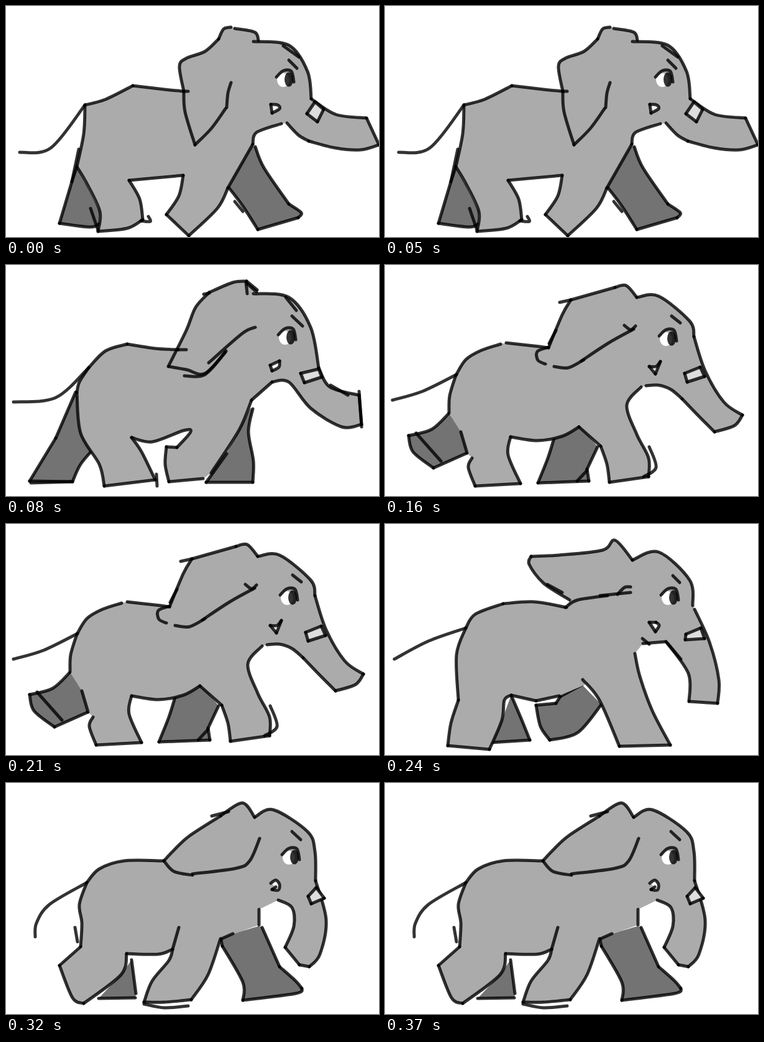
An HTML page that plays this animation: 600 px wide and 371 px high, repeating every 0.4 s.

```html
<!DOCTYPE html>
<html lang="en">
<head>
<meta charset="utf-8">
<title>Walking elephant</title>
<style>
html, body { margin: 0; width: 100%; height: 100%; overflow: hidden; background: #fff; }
svg { display: block; width: 100vw; height: 100vh; }
.pose { opacity: 0; animation: show 400ms step-end infinite; animation-delay: calc(var(--i) * 80ms - 400ms); }
@keyframes show { 0% { opacity: 1; } 20%, 100% { opacity: 0; } }
.skin { fill: #ababab; }
.far { fill: #737373; }
.band { fill: #dedede; }
.white { fill: #fff; }
.pupil { fill: #000; fill-opacity: .8; }
.ink { fill: none; stroke: #000; stroke-opacity: .8; stroke-width: 5; stroke-linecap: round; stroke-linejoin: round; }
</style>
</head>
<body>
<svg id="stage" viewBox="0 0 600 371"></svg>
<script>
const stage = document.getElementById('stage');
let group, count = 0;

function add(parent, tag, attrs) {
  const el = document.createElementNS(stage.namespaceURI, tag);
  for (const key in attrs) el.setAttribute(key, attrs[key]);
  return parent.appendChild(el);
}

function points(text) {
  const n = text.match(/-?\d+/g).map(Number);
  return n.filter((_, i) => i % 2 === 0).map((x, i) => [x, n[2 * i + 1]]);
}

// Catmull-Rom spline as Bezier commands, without the starting move.
function curve(p) {
  let d = '';
  for (let i = 0; i + 1 < p.length; i++) {
    const a = p[i - 1] || p[i], b = p[i], c = p[i + 1], e = p[i + 2] || c;
    const c1 = b.map((v, k) => v + (c[k] - a[k]) / 6);
    const c2 = c.map((v, k) => v - (e[k] - b[k]) / 6);
    d += 'C' + [c1, c2, c].join(' ');
  }
  return d;
}

const stroke = d => add(group, 'path', { class: 'ink', d });

// A filled outline: "/" is a corner, "~" a stretch without ink.
function shape(name, text) {
  let end, d = '';
  const inked = [];
  for (const part of text.split('/')) {
    const p = points(part);
    if (end) p.unshift(end);
    const move = 'M' + p[0], c = curve(p);
    d += end ? c : move + c;
    if (!part.includes('~')) inked.push(move + c);
    end = p[p.length - 1];
  }
  add(group, 'path', { class: name, d: d + 'Z' });
  inked.forEach(stroke);
}

function lines(text) {
  for (const part of text.split(',')) {
    const p = points(part);
    stroke('M' + p[0] + curve(p));
  }
}

function eye(x, y) {
  add(group, 'ellipse', { class: 'white', cx: x - 8, cy: y + 1, rx: 10, ry: 11 });
  add(group, 'ellipse', { class: 'pupil', cx: x + 1, cy: y, rx: 7, ry: 11.5 });
  const lid = [[-19, -4], [-8, -14], [5, -13], [9, 4]].map(([u, v]) => [x + u, y + v]);
  stroke('M' + lid[0] + curve(lid));
}

function pose(draw) {
  group = add(stage, 'g', { class: 'pose', style: `--i:${count++}` });
  draw();
}

pose(() => {
  shape('far', '114 258 106 282 / 86 349 / 135 355 150 350 / ~ 151 330 / ~ 114 258');
  shape('far', '401 226 415 260 455 318 / 475 332 470 340 / 405 359 / 380 320 357 290 / ~ 395 225');
  shape('skin', `127 159 160 150 204 128 / 255 134 286 137 / 279 97 290 84 320 73 342 53 / 350 37 362 34 /
    ~ 368 36 / 400 42 406 55 / ~ 398 57 / 455 63 485 105 491 149 / 530 174 580 180 / 600 223 /
    570 231 530 228 487 217 / 470 207 452 188 / ~ 443 189 / 403 203 397 222 / 357 292 /
    340 325 294 369 / 258 335 / 278 305 285 272 / 198 280 / 215 310 220 343 / 195 357 148 362 /
    151 330 130 285 114 258 / 125 205 127 159`);
  lines(`286 137 288 170 304 223, 304 223 330 197 353 165, 362 123 357 140 355 163, 286 137 293 137,
    446 64 471 82, 455 87 468 100, 22 235 72 228 127 159, 217 345 232 346 229 338, 136 325 148 360,
    117 230 106 282, 368 314 381 330`);
  shape('band', '497 154 / 511 166 / 501 186 / 484 173 / 497 154');
  shape('white', '426 158 428 172 / 440 165 437 159 426 158');
  eye(454, 118);
});

pose(() => {
  shape('far', '112 204 80 278 / 38 347 / 107 348 / 120 320 143 293 / ~ 112 204');
  shape('far', '397 231 390 268 398 315 397 349 / 322 349 / 355 303 / ~ 393 230');
  shape('skin', `133 165 160 138 195 127 / 240 134 277 136 / ~ 261 163 / 290 105 305 68 327 44 /
    365 28 387 26 / 404 40 / ~ 398 46 / 455 52 490 100 503 165 / 521 196 568 209 / 572 256 /
    540 260 490 230 455 188 428 188 / 395 217 / 375 265 330 334 / ~ 317 343 / 262 348 /
    256 320 258 292 / 275 293 / 297 268 285 266 235 284 202 277 / 218 300 240 345 / 158 355 /
    150 320 120 270 114 205 / 118 188 133 165`);
  lines(`262 163 290 168 320 174 354 138, 287 178 320 176 353 140, 326 157 380 110 401 100,
    318 47 327 45, 386 28 388 46, 388 30 403 43, 450 52 467 73, 277 136 290 136, 460 82 477 98,
    12 220 80 213 133 165, 242 336 243 355, 40 350 107 348, 568 203 572 260, 522 193 550 209`);
  shape('band', '474 174 / 503 167 / 508 180 / 480 189 / 474 174');
  shape('white', '425 161 428 170 / 439 164 440 154 / 425 161');
  eye(457, 116);
});

pose(() => {
  shape('far', '103 238 75 264 38 274 / 45 300 78 326 / 132 302 / ~ 122 265');
  shape('far', '272 278 262 310 246 350 / 328 347 / 325 328 / 342 292 / ~ 314 258');
  shape('skin', `114 177 130 152 155 137 186 127 / ~ 195 125 / 240 130 263 133 / 285 80 299 56 /
    370 36 / 388 33 405 52 / 440 50 490 90 497 115 / 515 170 545 220 575 241 / 562 258 530 268 /
    505 243 478 215 / 460 200 440 193 420 194 / ~ 412 196 / 389 225 405 272 424 310 424 340 /
    361 349 / 357 320 347 291 / 312 260 / 285 275 245 282 202 276 / 198 305 218 351 / 145 355 /
    134 325 140 310 / ~ 132 302 / ~ 122 268 / ~ 103 238 / 104 210 114 177`);
  lines(`281 60 299 56, 263 132 245 139 246 153 258 159, 272 163 295 165 320 152, 316 154 360 125 400 103,
    385 97 395 104 403 98, 461 82 475 93, 12 217 60 203 115 176, 425 292 436 325 416 340,
    275 105 264 126, 50 270 90 315, 325 330 309 347, 122 268 132 302`);
  shape('band', '482 174 / 507 164 / 514 179 / 486 188 / 482 174');
  shape('white', '425 163 435 175 / 443 155 / 436 163 425 163');
  eye(460, 118);
});

pose(() => {
  shape('far', '203 275 218 310 233 347 / 171 351 / ~ 188 315');
  shape('far', '243 291 275 288 / 282 277 / 317 258 / ~ 348 290 / 310 335 265 347 / 250 325 243 291');
  shape('skin', `130 167 145 145 190 128 / 240 125 292 134 / ~ 297 122 / 255 95 232 65 235 52 /
    280 50 350 42 370 26 398 58 / 440 45 490 90 495 131 / ~ 498 137 / 522 190 537 250 535 288 /
    489 285 / 488 240 452 189 / 415 192 / ~ 402 208 / 410 245 430 300 459 355 / 377 357 /
    345 283 318 250 / ~ 322 258 / ~ 280 276 / ~ 243 284 / 203 275 / 192 283 188 315 168 362 /
    101 356 / 106 320 118 283 / 115 210 130 167`);
  lines(`261 97 285 110, 290 134 310 122 358 115, 346 115 395 110, 374 113 385 102 395 101,
    463 83 474 94, 15 217 70 188 130 167, 455 192 476 217, 414 184 425 193, 243 284 280 276`);
  shape('band', '484 177 / 508 167 / 514 184 / 483 186 / 484 177');
  shape('white', '425 158 435 173 / 441 163 436 158 / 425 158');
  eye(463, 118);
});

pose(() => {
  shape('far', '202 284 209 338 / ~ 208 345 / 149 346 / ~ 185 308');
  shape('far', '412 232 440 295 / 466 318 476 330 / 466 338 381 349 / 381 320 348 262 / 345 248 / ~ 406 230');
  shape('skin', `130 160 150 138 190 125 254 125 / 270 108 295 85 345 53 / 380 32 400 55 /
    430 43 485 78 497 110 498 157 / 515 220 505 275 488 295 / 472 292 / 449 264 /
    463 230 460 200 438 188 / ~ 407 203 / 407 228 / ~ 345 250 / 325 308 298 348 / 255 352 222 352 /
    235 318 262 285 268 267 / 245 275 194 274 / 185 308 125 354 / 107 345 86 293 / 120 263 /
    122 225 118 195 130 160`);
  lines(`254 125 270 142 300 148, 300 146 370 137 392 125 408 89, 331 53 358 46, 268 267 278 232,
    460 78 474 91, 47 247 49 225 70 195 130 160, 222 355 255 361 293 358, 111 232 115 255, 347 250 365 242`);
  shape('band', '486 182 / 499 168 / 512 185 / 491 194 / 486 182');
  shape('white', '426 161 434 156 440 163 438 172 428 171 / 434 167 / ~ 426 161');
  eye(463, 119);
});
</script>
</body>
</html>
```
